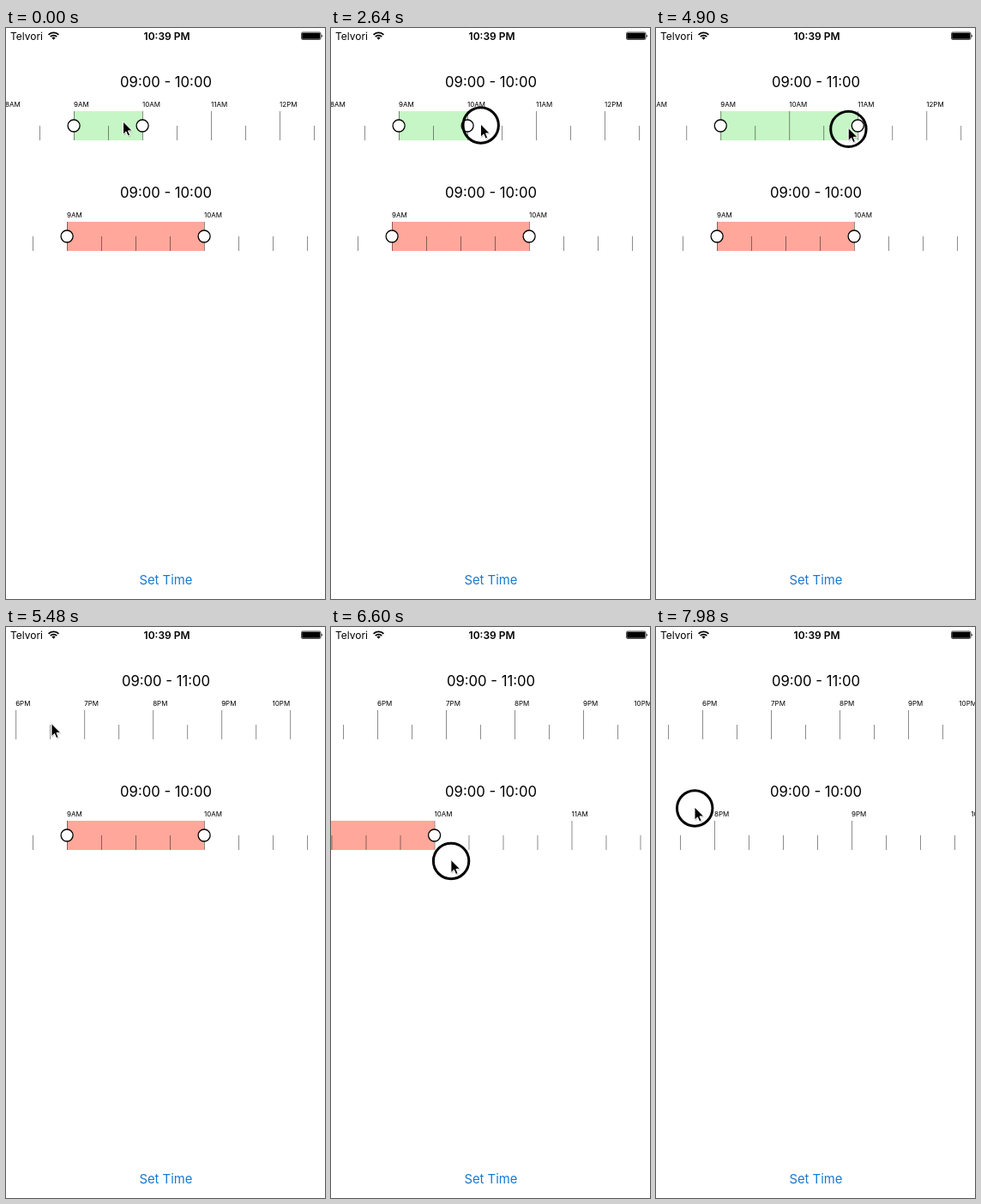
An HTML page that plays this animation: 372 px wide and 666 px high, repeating every 8 s.

```html
<!DOCTYPE html>
<html lang="en">
<head>
<meta charset="utf-8">
<title>Time range sliders</title>
<style>
  html, body { margin: 0; width: 100%; height: 100%; overflow: hidden; background: #fff; }
  svg { display: block; width: 372px; height: 666px; }
  text { font-family: Inter, Roboto, sans-serif; fill: #000; }
  .mid { text-anchor: middle; }
  .title { font-size: 16.7px; }
  .hour { font-size: 8px; }
</style>
</head>
<body>
<svg id="stage" viewBox="0 0 372 666">
  <rect width="372" height="666" fill="#fff"/>
  <text x="5" y="13.6" font-size="12">Telvori</text>
  <g fill="none" stroke="#000" stroke-width="1.8">
    <path d="M49.6 7.9a8.2 8.2 0 0 1 11.8 0"/>
    <path d="M51.8 10.2a5.1 5.1 0 0 1 7.4 0"/>
  </g>
  <path d="M53.4 11.6a3 3 0 0 1 4.2 0L55.5 13.8Z"/>
  <text class="mid" x="187.6" y="13.8" font-size="12" font-weight="600">10:39 PM</text>
  <rect x="344.5" y="5" width="22.5" height="8.5" rx="1.5" fill="none" stroke="#000" stroke-width=".7"/>
  <rect x="345.2" y="5.7" width="21.1" height="7.1" rx=".8"/>
  <path d="M367.8 7.6a2 2 0 0 1 0 3.4Z"/>
  <text class="mid" x="186.4" y="648.7" font-size="14.8" style="fill:#1579d2">Set Time</text>
</svg>
<script>
const LOOP = 8000, LAST_HOUR = 22, DECAY = 499;
const stage = document.getElementById('stage');

function add(parent, tag, attrs, text) {
  const el = document.createElementNS('http://www.w3.org/2000/svg', tag);
  for (const k in attrs) el.setAttribute(k, attrs[k]);
  if (text) el.textContent = text;
  return parent.appendChild(el);
}

// A scrolling hour ruler with a selected range; nine sits at x = 0 of its group.
function makeRuler({ top, nine, hourWidth, parts, fill }) {
  const title = add(stage, 'text', { class: 'title mid', x: 186.5, y: top - 28.2 });
  const group = add(stage, 'g', {});
  const range = add(group, 'rect', { x: 0, y: top, height: 34, fill });
  for (let i = 0; i <= LAST_HOUR * parts; i++) {
    const hour = i / parts, x = (hour - 9) * hourWidth, whole = i % parts === 0;
    add(group, 'rect', {
      x, y: top + (whole ? 0 : 17), width: 1, height: whole ? 34 : 17,
      fill: '#000', 'fill-opacity': 0.45
    });
    if (!whole) continue;
    const label = (hour % 12 || 12) + (hour < 12 ? 'AM' : 'PM');
    add(group, 'text', {
      class: 'hour', x, y: top - 5.3,
      'text-anchor': hour === LAST_HOUR ? 'end' : 'start'
    }, label);
  }
  const knob = () => add(group, 'circle', {
    cx: 0.1, cy: top + 17, r: 7, fill: '#fff', stroke: '#000', 'stroke-width': 1.3
  });
  knob();
  const endKnob = knob();
  return (shift, hours) => {
    const width = hours * hourWidth, half = hours % 1 ? '30' : '00';
    group.setAttribute('transform', `translate(${(nine - shift).toFixed(2)} 0)`);
    range.setAttribute('width', width);
    endKnob.setAttribute('cx', width + 0.1);
    title.textContent = `09:00 - ${9 + Math.floor(hours)}:${half}`;
  };
}

const drawTop = makeRuler({ top: 97, nine: 79, hourWidth: 80, parts: 2, fill: '#c6f6c5' });
const drawBottom = makeRuler({ top: 226, nine: 71, hourWidth: 160, parts: 4, fill: '#ffa79b' });

const ring = add(stage, 'circle', { r: 20.7, fill: 'none', stroke: '#000', 'stroke-width': 3 });
const arrow = add(stage, 'g', {});
const arrowPath = 'M0 0V15.2L3.5 11.9L5.7 17.1L8.2 16L6 10.9H10.8Z';
add(arrow, 'path', { d: arrowPath, transform: 'translate(.8 1.3)', fill: '#000', opacity: 0.2 });
add(arrow, 'path', { d: arrowPath, fill: '#000', stroke: '#fff', 'stroke-width': 1 });

const smooth = p => p * p * (3 - 2 * p);
const square = p => p * p;
const cube = p => p * p * p;

// Pointer stops: time, x, y, easing towards the stop.
const stops = [
  [0, 136.5, 109],
  [1100, 136.5, 109],
  [1700, 157, 110.5, smooth],
  [2340, 157, 110.5],
  [3270, 228, 116.5, smooth],
  [4846, 228, 116.5],
  [5043, 53, 112.5, cube],
  [5750, 53, 112.5],
  [6340, 250.4, 269, smooth],
  [6384, 250.4, 269],
  [6660, 23, 274, cube],
  [7360, 130.5, 239.5, smooth],
  [7690, 296.5, 236, smooth],
  [7700, 296.5, 236],
  [7980, 45, 210, square],
  [8000, 45, 210]
];
const presses = [[2260, 3320], [4790, 5043], [6360, 6660], [7690, 8000]];

function pointer(t) {
  const i = Math.max(1, stops.findIndex(s => s[0] >= t));
  const [t0, x0, y0] = stops[i - 1], [t1, x1, y1, ease = p => p] = stops[i];
  const p = ease((t - t0) / (t1 - t0));
  return [x0 + (x1 - x0) * p, y0 + (y1 - y0) * p];
}

const glide = (speed, t) => speed * DECAY * (1 - Math.exp(-t / DECAY));

function topShift(t, x) {
  if (t < 4846) return 0;
  if (t < 5043) return 228 - x;
  const speed = 2.67, limit = 745, room = limit - 175, u = t - 5043;
  const hit = -DECAY * Math.log(1 - room / (speed * DECAY));
  if (u < hit) return 175 + glide(speed, u);
  // Overshoot the end, then spring back.
  const b = u - hit;
  return limit + speed * Math.exp(-hit / DECAY) * b * Math.exp(-0.0109 * b);
}

function bottomShift(t, x) {
  if (t < 6384) return 0;
  if (t < 6660) return 250.4 - x;
  const coast = 227.4 + glide(2.939, Math.min(t, 7700) - 6660);
  return t < 7700 ? coast : coast + 296.5 - x;
}

function rangeHours(t, x) {
  if (t < 2340) return 1;
  if (t > 3270) return 2;
  return 1 + Math.round((x - 157) / 40) / 2;
}

function draw(t) {
  const [x, y] = pointer(t);
  drawTop(topShift(t, x), rangeHours(t, x));
  drawBottom(bottomShift(t, x), 1);
  arrow.setAttribute('transform', `translate(${x.toFixed(2)} ${y.toFixed(2)})`);
  ring.setAttribute('cx', x + 0.2);
  ring.setAttribute('cy', y + 1.5);
  const down = presses.some(([a, b]) => t >= a && t < b);
  ring.setAttribute('visibility', down ? 'visible' : 'hidden');
}

const start = performance.now();
function tick() {
  draw((performance.now() - start) % LOOP);
  requestAnimationFrame(tick);
}
tick();
</script>
</body>
</html>
```
